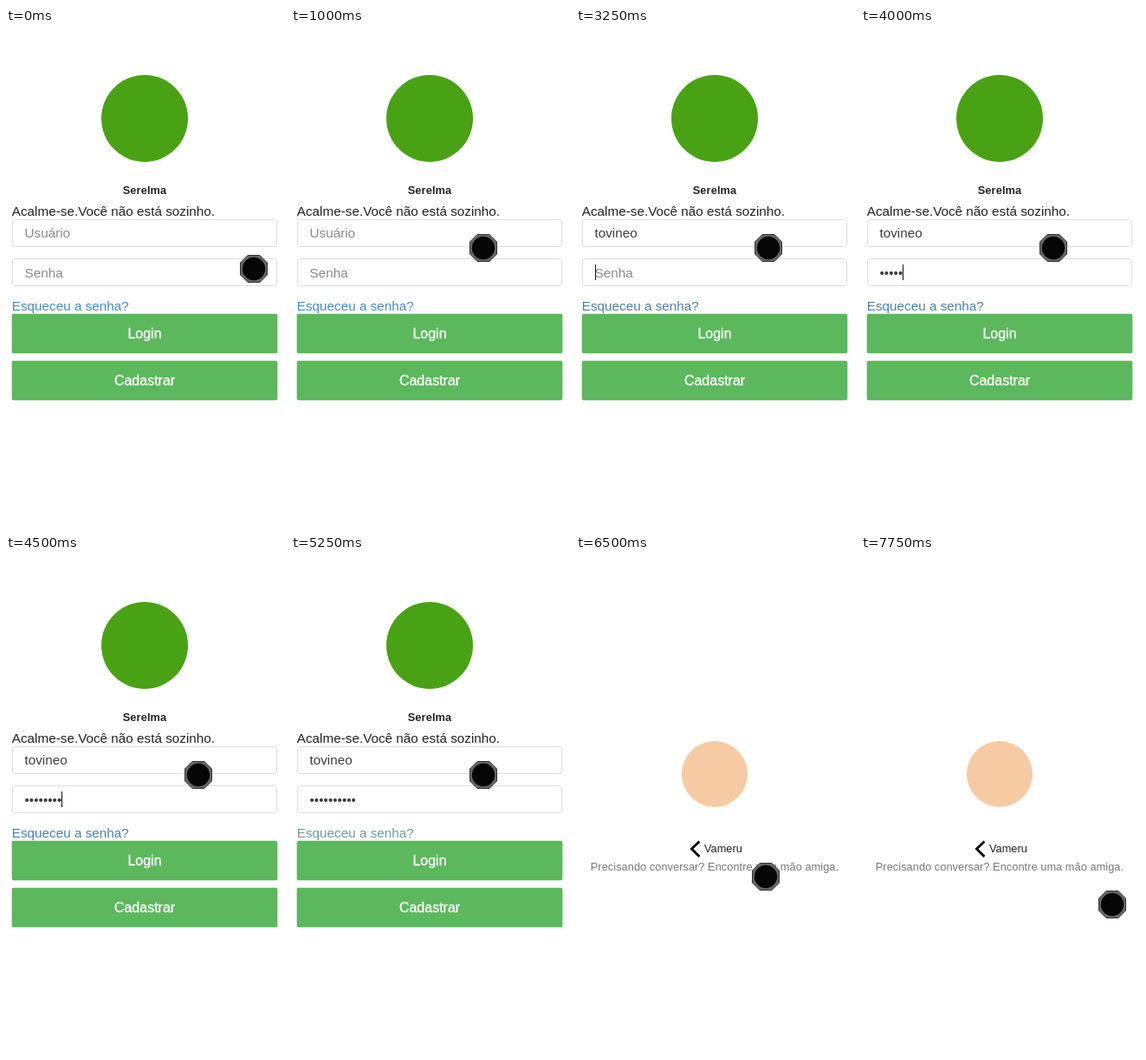
An HTML page for the animation above (8 s loop, 322 by 574 pixels).

```html
<!DOCTYPE html>
<html lang="pt">
<head>
<meta charset="utf-8">
<style>
  html, body { margin: 0; width: 100%; height: 100%; overflow: hidden; background: #fff; }
  svg { display: block; width: 322px; height: 574px; }
  text { font: 15.27px "Liberation Sans", Arial, sans-serif; fill: #222; white-space: pre; }
  .field { fill: #fff; stroke: #ddd; }
  .button { fill: #5cb85c; }
  .label { font-size: 16px; fill: #fff; stroke: #fff; stroke-width: .3px; text-anchor: middle; }
  .title { font-size: 12.8px; font-weight: bold; letter-spacing: .1px; text-anchor: middle; }
  .small { font-size: 12.8px; }
  .hint { fill: #777; letter-spacing: .04px; }
</style>
</head>
<body>
<svg viewBox="0 0 322 574">
  <g id="login">
    <circle cx="160" cy="104" r="50" fill="#49a214"/>
    <text class="title" x="160" y="191">Serelma</text>
    <text x="6.8" y="216">Acalme-se.Você não está sozinho.</text>
    <rect class="field" x="7.5" y="220.5" width="305" height="31" rx="3"/>
    <rect class="field" x="7.5" y="265.5" width="305" height="31" rx="3"/>
    <text id="user" x="21.5" y="241"></text>
    <text id="pass" x="21.5" y="286.5"></text>
    <rect id="caret" width="1" height="18" fill="#111"/>
    <text id="link" x="6.8" y="325">Esqueceu a senha?</text>
    <rect class="button" x="6.7" y="328.7" width="306.6" height="45.6" rx="2"/>
    <rect class="button" x="6.7" y="382.7" width="306.6" height="45.6" rx="2"/>
    <text class="label" x="160" y="357">Login</text>
    <text class="label" x="160" y="411">Cadastrar</text>
  </g>
  <g id="help">
    <circle cx="160" cy="252" r="38" fill="#f6cba3"/>
    <path d="M142.5 329.5L133.5 338L142.5 347" fill="none" stroke="#111" stroke-width="3"/>
    <text class="small" x="148" y="342">Vameru</text>
    <text class="small hint" x="16.8" y="363">Precisando conversar? Encontre uma mão amiga.</text>
  </g>
  <g id="pointer">
    <path d="M-7-15.5H7L15.5-7V7L7 15.5H-7L-15.5 7V-7Z" fill="#666" stroke="#333"/>
    <circle r="13.2" fill="#060606"/>
  </g>
</svg>
<script>
const LOOP = 8000;
const NAME = 'tovineo';
const $ = id => document.getElementById(id);
const [login, help, user, pass, caret, link, pointer] =
  ['login', 'help', 'user', 'pass', 'caret', 'link', 'pointer'].map($);

// Each track lists [start time, value]; values hold until the next entry.
const nameLength = [[0, 0], [1500, 1], [1750, 3], [2000, 4], [2250, 6], [2500, 7]];
const passLength = [[0, 0], [3500, 2], [3750, 3], [4000, 5], [4250, 7], [4500, 8], [4750, 10]];
const caretOn = [[0, 0], [500, 1], [1000, 0], [1500, 1], [3000, 0], [3250, 1], [5250, 0], [5750, 1], [6250, 0]];
const linkColor = [[0, '#428bca'], [3250, '#4c7fa9'], [5250, '#71999c'], [5750, '#4485bd']];
const position = [[0, '286 277'], [250, '222 253'], [6250, '219 370'], [7250, '264 391'], [7500, '288 400'], [7750, '290 402']];

const at = (track, t) => track.findLast(([start]) => start <= t)[1];

function fill(field, value, placeholder) {
  field.textContent = value || placeholder;
  field.style.fill = value ? '#3c3c3c' : '#888';
}

function render(t) {
  const onLogin = t < 6500;
  login.style.display = onLogin ? '' : 'none';
  help.style.display = onLogin ? 'none' : '';
  pointer.setAttribute('transform', `translate(${at(position, t)})`);
  if (!onLogin) return;

  const name = NAME.slice(0, at(nameLength, t));
  const dots = '•'.repeat(at(passLength, t));
  fill(user, name, 'Usuário');
  fill(pass, dots, 'Senha');
  link.style.fill = at(linkColor, t);

  const inPass = t >= 3250;
  const typed = inPass ? dots : name;
  const width = typed ? (inPass ? pass : user).getComputedTextLength() : 0;
  caret.setAttribute('x', Math.round(21.5 + width));
  caret.setAttribute('y', inPass ? 272 : 227.5);
  caret.style.display = at(caretOn, t) ? '' : 'none';
}

const begin = performance.now();
function tick() {
  render((performance.now() - begin) % LOOP);
  requestAnimationFrame(tick);
}
tick();
</script>
</body>
</html>
```
